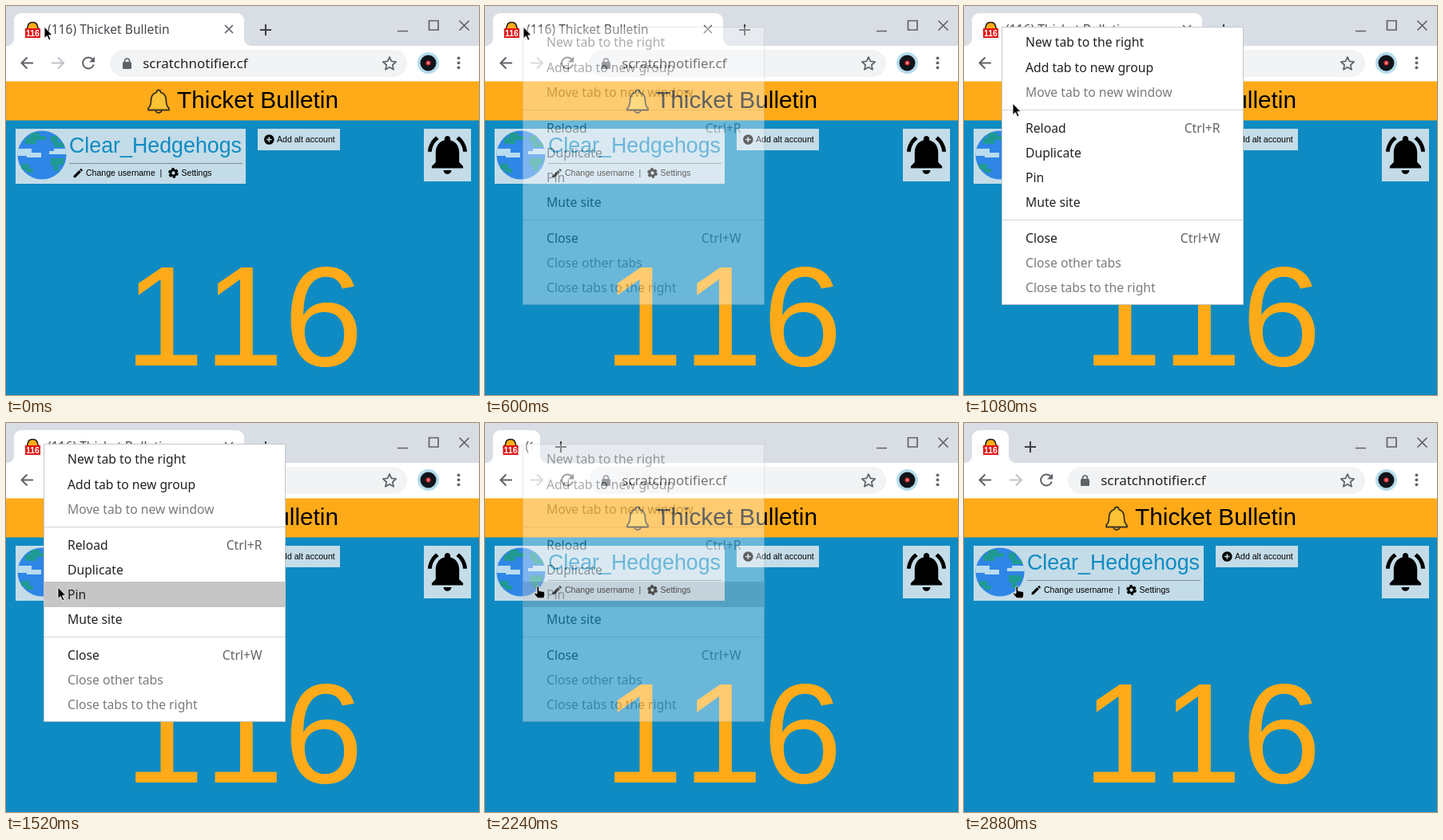
An HTML page that plays this animation: 592 by 488 pixels, repeating every 2920 ms.

```html
<!DOCTYPE html>
<html lang="en">
<head>
<meta charset="utf-8">
<title>Pinning a tab</title>
<style>
html, body { margin: 0; width: 100%; height: 100%; overflow: hidden; }
.stage { position: relative; width: 592px; height: 488px; overflow: hidden; background: #0f8bc3; }
.stage > svg { position: absolute; left: 0; top: 0; }
.ui { font-family: "Noto Sans", sans-serif; font-size: 15.7px; fill: #222; }
.page { font-family: "Liberation Sans", Arial, sans-serif; font-size: 10.55px; }
.count { font-size: 179px; fill: #ffab19; font-kerning: none; }
.icon { fill: none; stroke: #5f6368; stroke-width: 2; }
.thin { stroke-width: 1.7; }
.off { fill: #7b7b7b; }
.key { fill: #626262; text-anchor: end; }

.tab { position: absolute; left: 10px; top: 9px; width: 288px; height: 41px; background: #fff; border-radius: 9px 9px 0 0; }
.tab::before, .tab::after { content: ""; position: absolute; bottom: 0; width: 9px; height: 9px; }
.tab::before { right: 100%; background: radial-gradient(circle at 0 0, transparent 8.6px, #fff 9.2px); }
.tab::after { left: 100%; background: radial-gradient(circle at 100% 0, transparent 8.6px, #fff 9.2px); }
.tab svg { position: absolute; overflow: visible; }
.fav { left: 13px; top: 9px; }
.title { position: absolute; left: 42px; right: 8px; top: 0; height: 41px; overflow: hidden; white-space: nowrap;
  font: 15.6px/41px "Noto Sans", sans-serif; color: #45494d; }
.close { left: 264px; top: 15px; }
.plus { left: calc(100% + 19.5px); top: 13.5px; }

.tab, .fav, .title, .close, .menu, .hover, .arrow, .hand { animation: 2920ms linear infinite; }
.tab { animation-name: shrink; }
.fav, .title { animation-name: nudge; }
.close { animation-name: leave; }
.arrow { animation-name: leave, move; }
.hand { animation-name: enter; }
.menu { animation-name: fade; }
.hover { animation-name: rows; animation-timing-function: step-end; }

@keyframes shrink {
  0%, 72.56% { width: 288px; }
  72.59% { width: 235px; animation-timing-function: cubic-bezier(.2, .6, .5, 1); }
  78.8%, 100% { width: 46px; }
}
@keyframes nudge {
  0%, 72.56% { transform: none; }
  72.59% { transform: translateX(-4.5px); }
  78.8%, 100% { transform: none; }
}
@keyframes leave {
  0%, 72.56% { opacity: 1; }
  72.59%, 100% { opacity: 0; }
}
@keyframes enter {
  0%, 72.56% { opacity: 0; }
  72.59%, 100% { opacity: 1; }
}
@keyframes fade {
  0%, 17% { opacity: 0; }
  20.55% { opacity: .38; }
  26%, 72.56% { opacity: 1; }
  72.59% { opacity: .72; }
  80.8% { opacity: .05; }
  84.9%, 100% { opacity: 0; }
}
@keyframes move {
  0%, 20.55% { transform: translate(48px, 26px); }
  37% { transform: translate(61px, 122px); }
  52.05%, 100% { transform: translate(65px, 206px); }
}
@keyframes rows {
  0% { opacity: 0; transform: translateY(30px); }
  21.9% { opacity: 1; transform: translateY(30px); }
  27.39% { opacity: 1; transform: translateY(61px); }
  32.87% { opacity: 0; transform: translateY(61px); }
  39.72% { opacity: 1; transform: translateY(138px); }
  45.2% { opacity: 1; transform: translateY(168px); }
  50.68%, 100% { opacity: 1; transform: translateY(199px); }
}
</style>
</head>
<body>
<div class="stage">
  <svg width="592" height="488">
    <!-- window frame and toolbar -->
    <path fill="#d9dde4" d="M0 0H592V50H0z"/>
    <path fill="#fff" d="M0 50H592V95H0z"/>
    <rect x="130" y="55" width="372" height="34" rx="17" fill="#f1f3f4"/>
    <g class="icon">
      <path class="thin" d="M490 31.5h13M529.5 18.5h11.5v11.5h-11.5zM567.5 18.5l12 12m0-12l-12 12"/>
      <path d="M34 71.5H20M26.5 64.5l-7 7 7 7"/>
      <path stroke="#c0c3c7" d="M57 71.5H71M65 64.5l7 7-7 7"/>
      <path d="M108.5 67a7 7 0 1 0 1.3 6.5"/>
      <path class="thin" d="M148.5 71v-2a3 3 0 0 1 6 0v2"/>
      <path class="thin" stroke-linejoin="round" d="M480 64l2.4 5.4 5.8.6-4.4 4 1.3 5.8-5.1-3-5.1 3 1.3-5.8-4.4-4 5.8-.6z"/>
    </g>
    <g fill="#5f6368">
      <path d="M111 63.5v7h-7z"/>
      <rect x="146" y="70" width="11" height="9" rx="1.5"/>
      <circle cx="566.5" cy="65.3" r="1.9"/>
      <circle cx="566.5" cy="71.3" r="1.9"/>
      <circle cx="566.5" cy="77.3" r="1.9"/>
    </g>
    <text class="ui" x="171.2" y="78" style="font-size:17px">scratchnotifier.cf</text>
    <circle cx="528.5" cy="71.5" r="13.5" fill="#b5dcec"/>
    <circle cx="528.5" cy="71.5" r="10" fill="#11151b"/>
    <circle cx="528.5" cy="71.5" r="3" fill="#e8303a"/>
    <circle cx="528.5" cy="71.5" r=".9" fill="#fff"/>

    <!-- page -->
    <g class="page">
      <path fill="#ffab19" d="M0 94.5H592V143.5H0z"/>
      <g stroke="#3b3320" stroke-width="1.8" stroke-linejoin="round">
        <path fill="#f0a91c" d="M187 130a4 4 0 0 0 8 0z"/>
        <path fill="#fdc233" d="M191 105.5c-2 0-2.6 1.4-2.6 2.8-5 1.5-6.9 5.7-6.9 10.7 0 5-1 7-3.5 9.5v2h26v-2c-2.5-2.5-3.5-4.5-3.5-9.5 0-5-1.9-9.2-6.9-10.7 0-1.4-.6-2.8-2.6-2.8z"/>
      </g>
      <text x="214" y="128" font-size="29.8">Thicket Bulletin</text>

      <path fill="#c4dce8" d="M12 154H300V223H12zM315 154H418V181H315zM523 154H582V220H523z"/>
      <clipPath id="globe"><circle cx="45" cy="187" r="30.5"/></clipPath>
      <g clip-path="url(#globe)">
        <path fill="#2f86e6" d="M14 156h62v62H14z"/>
        <path fill="#1f9a92" d="M30 159h12v4h8v5H38v5H24v-8h6zM56 163h9v8h8v6H60v-6h-4zM56 191h16v8h-6v8h-6v-7h-4zM19 198h10v6h5v5h-9v-4h-6z"/>
        <path fill="#b9dcef" d="M14 179h18v5h12v6H26v-2H14zM60 179h16v7H54v-4h6z"/>
      </g>
      <text x="79" y="184" font-size="26.8" fill="#0f8bc3">Clear_Hedgehogs</text>
      <path stroke="#7c8b93" d="M79 197.500H296"/>
      <path transform="translate(82.7 202.1) scale(.63)" d="M3 17.25V21h3.75L17.8 9.9l-3.75-3.75zM20.7 7c.4-.4.4-1 0-1.4l-2.3-2.3c-.4-.4-1-.4-1.4 0l-1.9 1.8 3.75 3.75z"/>
      <text x="100" y="213">Change username</text>
      <text x="192.5" y="213">|</text>
      <g fill="none" stroke="#000">
        <circle cx="209.5" cy="209.5" r="3.6" stroke-width="2.9"/>
        <circle cx="209.5" cy="209.5" r="5.4" stroke-width="2" stroke-dasharray="3.2 2.455"/>
      </g>
      <text x="219.5" y="213">Settings</text>
      <circle cx="329.3" cy="167.5" r="6.3"/>
      <path stroke="#c4dce8" stroke-width="1.5" d="M326 167.5h6.6m-3.3-3.3v6.6"/>
      <text x="339" y="171">Add alt account</text>
      <path transform="translate(523.1 156.9) scale(2.45)" d="M7.6 4.1L6.15 2.65C3.75 4.5 2.2 7.3 2 10.5h2c.15-2.65 1.5-5 3.6-6.4zm12.4 6.4h2c-.15-3.2-1.75-6-4.15-7.85l-1.4 1.45c2 1.45 3.4 3.75 3.55 6.4zM18 11c0-3.1-1.6-5.65-4.5-6.3V4c0-.8-.7-1.5-1.5-1.5s-1.5.7-1.5 1.5v.7C7.6 5.35 6 7.9 6 11v5l-2 2v1h16v-1l-2-2zM12 22c1.1 0 2-.9 2-2h-4c0 1.1.9 2 2 2z"/>
      <text class="count" x="148.4" y="451.4">116</text>
    </g>
  </svg>

  <div class="tab">
    <svg class="fav" width="22" height="24">
      <path fill="#ffab19" stroke="#1d1a14" stroke-width="1.5" d="M2 12c2-2 2-3 2.4-5 .5-2.5 2.500-4.500 6-4.500s5.500 2 6 4.500c.4 2 .4 3 2.4 5z"/>
      <path fill="#e01515" d="M1 10H20V22H1z"/>
      <text x="10.5" y="20" text-anchor="middle" fill="#fff" font-family="Liberation Sans, Arial, sans-serif" font-size="10.5" font-weight="bold">116</text>
    </svg>
    <div class="title">(116) Thicket Bulletin</div>
    <svg class="close" width="10" height="10"><path class="icon thin" d="M0 0l10 10M10 0L0 10"/></svg>
    <svg class="plus" width="14" height="14"><path class="icon" style="stroke:#3c4043" d="M0 7h14M7 0v14"/></svg>
  </div>

  <svg width="592" height="488">
    <g class="menu ui">
      <path fill="#fff" stroke="#c3c6c9" d="M47.5 26.5H349.5V374.5H47.5z"/>
      <rect class="hover" x="48" width="301" height="32" fill="#c6c6c6"/>
      <path stroke="#d4d4d4" d="M48 130.5H349M48 268.5H349"/>
      <text x="77" y="51">New tab to the right</text>
      <text x="77" y="83">Add tab to new group</text>
      <text x="77" y="114" class="off">Move tab to new window</text>
      <text x="77" y="159">Reload</text>
      <text x="320.5" y="159" class="key">Ctrl+R</text>
      <text x="77" y="190">Duplicate</text>
      <text x="77" y="221">Pin</text>
      <text x="77" y="252">Mute site</text>
      <text x="77" y="297">Close</text>
      <text x="320.5" y="297" class="key">Ctrl+W</text>
      <text x="77" y="328" class="off">Close other tabs</text>
      <text x="77" y="359" class="off">Close tabs to the right</text>
    </g>
    <g fill="#000" stroke="#fff" stroke-width=".9" stroke-linejoin="round">
      <path class="arrow" d="M0 0V14.5l3.3-3 2.4 5.3 2.3-1-2.4-5.2H10z"/>
      <g class="hand">
        <path transform="translate(61 204.8) scale(1.1 1)" d="M3.5 1.5q0-1.5 1.3-1.5t1.3 1.5V5.5l5 1q1.4.4 1.4 2v3L11.5 15H4.5L.5 10q-.8-1.5 1-1.7l2 1z"/>
      </g>
    </g>
  </svg>
</div>
</body>
</html>
```
